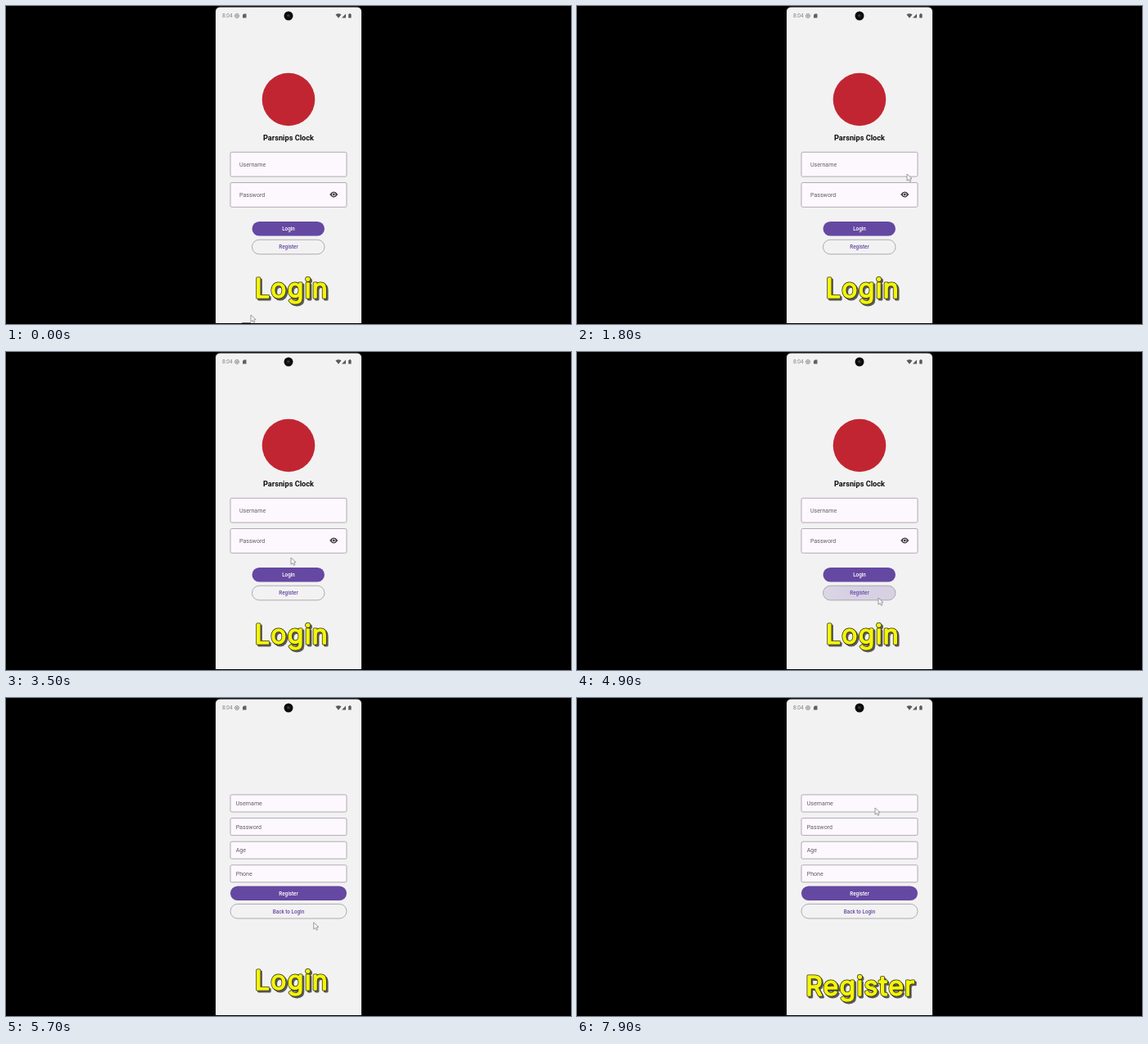
Recreate the animation shown at these times as an HTML page. Size 690 by 388 pixels, loop 8 s.

```html
<!DOCTYPE html>
<html lang="en">
<head>
<meta charset="utf-8">
<title>Login and register</title>
<style>
html, body { margin: 0; width: 100%; height: 100%; overflow: hidden; background: #000; }
svg { display: block; width: 690px; height: 388px; font-family: Roboto, sans-serif; }
.field { fill: #fdf8fd; stroke: #aba1ac; stroke-width: .9; }
.label { font-size: 7.1px; fill: #625e66; }
.btn { font-size: 6.3px; font-weight: 500; text-anchor: middle; }
.caption { font: 400 32px Inter, sans-serif; letter-spacing: 1.3px; text-anchor: middle; stroke-linejoin: round; }
</style>
</head>
<body>
<svg id="stage" viewBox="0 0 690 388">
  <defs>
    <clipPath id="pill"><rect x="300.5" y="285" width="88.5" height="18" rx="9"/></clipPath>
    <radialGradient id="wave"><stop offset=".5" stop-color="#6548a2" stop-opacity=".1"/><stop offset="1" stop-color="#6548a2" stop-opacity=".05"/></radialGradient>
  </defs>
  <rect width="690" height="388"/>
  <path d="M254.500 388V8Q254.500 .5 262 .5H428Q435 .5 435 8V388" fill="none" stroke="#151517"/>
  <path id="screen" d="M256 387V7Q256 1.500 262 1.500H428Q434 1.500 434 7V387Z" fill="#f2f2f2"/>
  <g id="status" fill="#858588">
    <text x="264" y="14.300" font-size="6.600">8:04</text>
    <circle cx="282" cy="12" r="2.400" fill="none" stroke="#858588"/>
    <circle cx="282" cy="12" r="1"/>
    <path d="M290.500 9.500H293.500V14.500H289V11Z" fill="#606065"/>
    <g fill="#58585d">
      <path d="M402.500 10.500Q406 8 409.500 10.500L406 14.800Z"/>
      <path d="M415 9.500V14.500H410Z"/>
      <path d="M419 9.300H421V10H421.600V14.600H418.200V10H419Z"/>
    </g>
    <circle cx="345" cy="12" r="5.500" fill="#0b0b0d"/>
    <circle cx="345" cy="12" r="2" fill="#26282c"/>
    <circle cx="344.300" cy="11.300" r=".6" fill="#6c7076"/>
  </g>
  <g id="login"></g>
  <g id="register"></g>
  <g id="capLogin"></g>
  <g id="capRegister"></g>
  <rect id="edge" x="288" y="386" width="11" height="1" fill="#77777a"/>
  <path id="cursor" d="M0 0V8.200L2 6.500L3.500 9.300L4.900 8.600L3.600 5.900L6 5.500Z" fill="#fafafa" stroke="#85858a" stroke-width=".8" stroke-linejoin="round"/>
</svg>
<script>
const $ = id => document.getElementById(id);

const field = (x, y, w, h, label, pad, id = '') =>
  `<rect class="field" x="${x}" y="${y}" width="${w}" height="${h}" rx="1.8"/>
   <text class="label" ${id && `id="${id}"`} x="${x + pad}" y="${y + h / 2 + 2.7}">${label}</text>`;

const button = (x, y, w, label, solid) =>
  `<rect x="${x}" y="${y}" width="${w}" height="17.6" rx="8.8" fill="${solid ? '#6548a2' : 'none'}"
     stroke="${solid ? 'none' : '#a8a2ad'}" stroke-width=".9"/>
   <text class="btn" x="345" y="${y + 11.1}" fill="${solid ? '#fff' : '#6548a2'}">${label}</text>`;

// layers: shadow, outline, face
const caption = (x, y, word) => [
  [1.9, 2.1, '#5a5a5c', 2.8], [0, 0, '#33331c', 3], [0, 0, '#f5f50a', 1.5]
].map(([dx, dy, color, width], i) =>
  `<text class="caption" x="${x + dx}" y="${y + dy}" fill="${color}" stroke="${color}"
     stroke-width="${width}" ${i < 2 ? 'aria-hidden="true"' : ''}>${word}</text>`).join('');

$('login').innerHTML = `
  <circle cx="345" cy="114" r="32.3" fill="#c22532"/>
  <text x="345" y="164" font-size="9.2" font-weight="700" text-anchor="middle" fill="#0c0c0e">Parsnips Clock</text>
  ${field(274, 178.3, 142, 29.8, 'Username', 11)}
  ${field(274, 215.5, 142, 29.8, 'Password', 11)}
  <path d="M395.200 230Q400.300 223.200 405.400 230Q400.300 236.800 395.200 230Z" fill="#3f3b44"/>
  <circle cx="400.300" cy="230" r="2.300" fill="#fdf7fd"/><circle cx="400.300" cy="230" r="1.400" fill="#3f3b44"/>
  ${button(300.5, 263, 88.5, 'Login', true)}
  <g clip-path="url(#pill)"><rect id="tint" x="300" y="285" width="90" height="18" fill="#6548a2"/>
    <circle id="ripple" cx="368" cy="299" fill="url(#wave)"/></g>
  ${button(300.5, 285.2, 88.5, 'Register', false)}`;

$('register').innerHTML = `
  <rect x="256" y="20" width="178" height="367" fill="#f2f2f2"/>
  ${['Username', 'Password', 'Age', 'Phone'].map((s, i) =>
    field(274, 118 + 28.6 * i, 142, 21, s, 6.7, 'hint' + i)).join('')}
  ${button(274, 229.4, 142, 'Register', true)}
  ${button(274, 251.4, 142, 'Back to Login', false)}`;

$('capLogin').innerHTML = caption(349, 356.3, 'Login');
$('capRegister').innerHTML = caption(346.3, 363, 'Register');

// time, x, y of the pointer tip
const path = [
  [0, 299, 377], [400, 400, 290], [900, 330, 235], [1300, 285, 290], [1800, 403, 205],
  [2200, 350, 165], [2700, 395, 225], [3100, 375, 170], [3500, 348, 251], [3700, 348, 251],
  [4300, 368, 300], [4900, 368, 300], [5100, 369, 298], [5500, 369, 298], [6100, 395, 205],
  [6600, 395, 205], [7000, 379, 265], [7200, 379, 264], [7300, 380, 262], [7400, 380, 262],
  [7900, 364, 134], [8000, 364, 134]
];
const LOOP = 8000, STEP = 100;
const clamp = v => Math.max(0, Math.min(1, v));
const show = (id, on) => $(id).style.display = on ? '' : 'none';

function pointer(t) {
  const i = path.findIndex(p => p[0] > t);
  const [t0, x0, y0] = path[i - 1], [t1, x1, y1] = path[i];
  const k = (t - t0) / (t1 - t0), e = k * k * (3 - 2 * k);
  return [x0 + (x1 - x0) * e, y0 + (y1 - y0) * e];
}

function draw(t) {
  $('cursor').setAttribute('transform', `translate(${pointer(t)})`);
  show('edge', t < 100);

  const press = clamp((t - 4600) / 300);
  $('tint').setAttribute('opacity', .1 * press);
  $('ripple').setAttribute('r', 76 * press);

  const open = clamp((t - 4900) / 400);
  const scale = 1 - .08 * (1 - open) ** 2;
  show('login', t < 5100);
  show('register', t >= 5000);
  $('register').setAttribute('opacity', clamp((t - 4900) / 150));
  $('register').setAttribute('transform', `translate(345 194) scale(${scale}) translate(-345 -194)`);
  show('hint2', t >= 5200);
  show('hint3', t >= 5200);

  show('capLogin', t < 5800);
  show('capRegister', t >= 6800);
}

const start = performance.now();
function tick() {
  const t = (performance.now() - start) % LOOP;
  draw(Math.floor(t / STEP) * STEP);
  requestAnimationFrame(tick);
}
tick();
</script>
</body>
</html>
```
